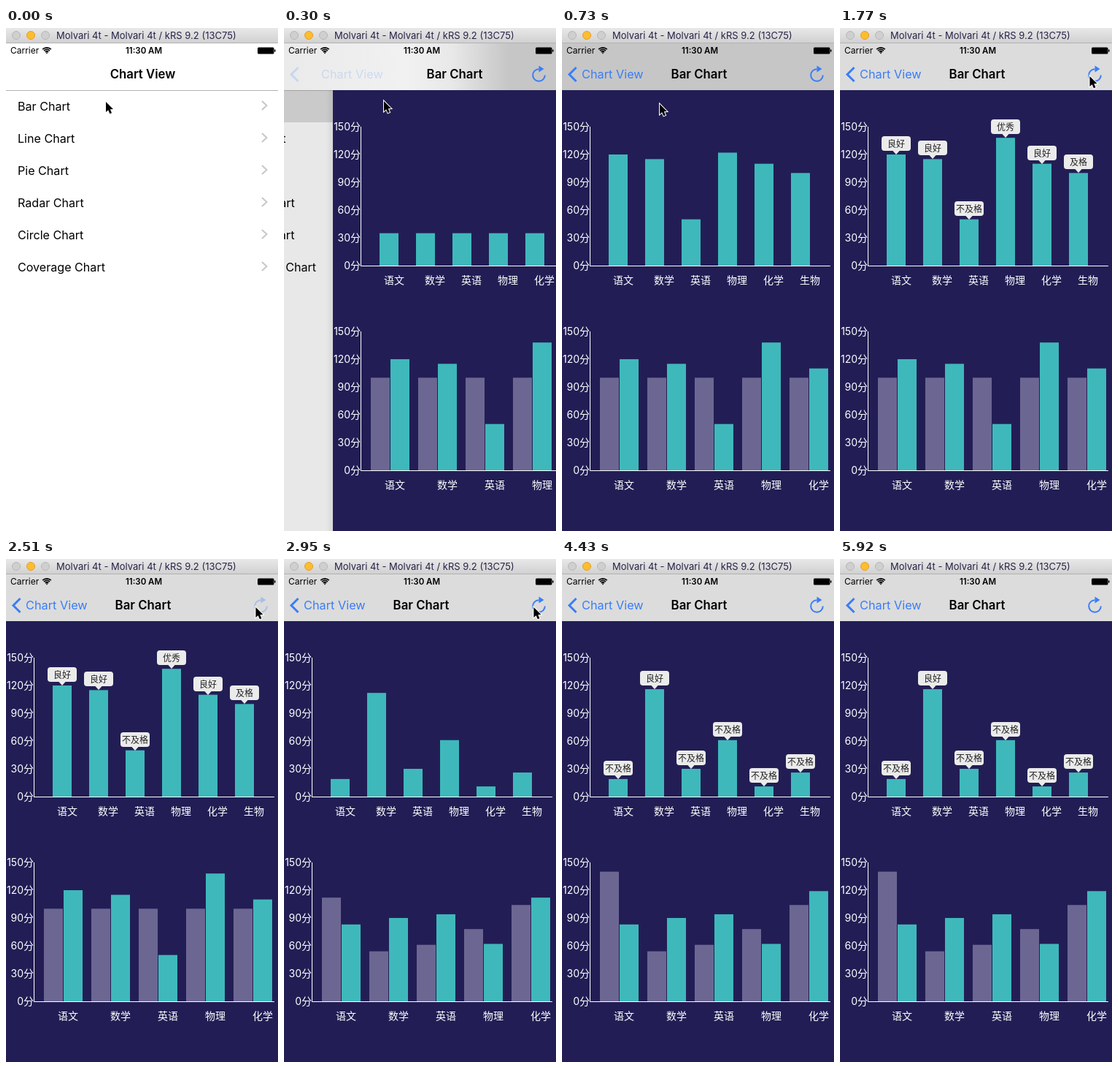
These frames come from a looping animation (373 px wide and 688 px high, 6950 ms). An HTML page with a canvas:

```html
<!DOCTYPE html>
<html lang="en">
<meta charset="utf-8">
<title>Chart View</title>
<style>
  html, body { margin: 0; width: 100%; height: 100%; overflow: hidden; background: #fff; }
  canvas { display: block; }
</style>
<canvas id="stage" width="373" height="688"></canvas>
<script>
const ctx = document.getElementById('stage').getContext('2d');
const W = 373, H = 688, LOOP = 6950;
const BLUE = '#3a7df7', NAVY = '#221e55', TEAL = '#3fb8bb', MAUVE = '#6c6792';
const PUSH = 128, REFRESH = 2441;

// The screen is refreshed at these moments and holds in between.
const TICKS = [0, 150, 300, 440, 590, 730, 880, 1020, 1170, 1320, 1470, 1620, 1770,
  2370, 2520, 2660, 2810, 2950, 3100, 3240, 3390, 3540, 3690,
  3980, 4130, 4280, 4430, 5630, 5780, 5920];

// Pointer path: time, x, y
const PATH = [[0, 137, 101], [300, 137, 100], [730, 134, 104], [1020, 134, 104],
  [1620, 342.5, 66], [3840, 342.5, 66], [4280, 362, 646], [4430, 400, 720],
  [5629, 400, 720], [5630, 306, 583], [5780, 307, 653], [5920, 307, 720], [LOOP, 307, 720]];

const ROWS = ['Bar', 'Line', 'Pie', 'Radar', 'Circle', 'Coverage'];
const SUBJECTS = ['语文', '数学', '英语', '物理', '化学', '生物'];
const FIRST = {
  start: 127, rate: 0.2023, animateAll: false,
  single: [120, 115, 50, 138, 110, 100],
  back: [100, 100, 100, 100, 100], front: [120, 115, 50, 138, 110]
};
const SECOND = {
  start: REFRESH, rate: 0.22, animateAll: true,
  single: [19, 116, 30, 61, 11, 26],
  back: [140, 54, 61, 78, 104], front: [83, 90, 94, 62, 119]
};

const clamp = v => Math.max(0, Math.min(1, v));
const grade = v => v > 130 ? '优秀' : v >= 110 ? '良好' : v >= 90 ? '及格' : '不及格';
const barHeight = v => v * 190 / 150;

function rect(x, y, w, h, color) {
  ctx.fillStyle = color;
  ctx.fillRect(x, y, w, h);
}

function text(s, x, y, size, color, align = 'left', weight = 400) {
  ctx.font = `${weight} ${size}px Inter, "Noto Sans CJK SC", "Noto Sans CJK", sans-serif`;
  ctx.textAlign = align;
  ctx.fillStyle = color;
  ctx.fillText(s, x, y);
}

function gradient(x0, y0, x1, y1, ...stops) {
  const g = ctx.createLinearGradient(x0, y0, x1, y1);
  stops.forEach(([at, color]) => g.addColorStop(at, color));
  return g;
}

function shape(points, close) {
  ctx.beginPath();
  points.forEach(([x, y]) => ctx.lineTo(x, y));
  if (close) ctx.closePath();
}

function line(points, color, width) {
  shape(points);
  ctx.strokeStyle = color;
  ctx.lineWidth = width;
  ctx.stroke();
}

function faded(alpha, draw) {
  ctx.save();
  ctx.globalAlpha *= clamp(alpha);
  draw();
  ctx.restore();
}

function windowBar() {
  rect(0, 0, W, 20, gradient(0, 0, 0, 20, [0, '#e9e8e9'], [1, '#d2d1d2']));
  rect(0, 20, W, 1, '#b4b3b4');
  [[14, '#d0cfd0', '#b8b7b8'], [34, '#fdbd2e', '#e0a028'], [54, '#d0cfd0', '#b8b7b8']].forEach(([x, fill, edge]) => {
    ctx.beginPath();
    ctx.arc(x, 10, 5.5, 0, 7);
    ctx.fillStyle = fill;
    ctx.fill();
    ctx.strokeStyle = edge;
    ctx.lineWidth = 1;
    ctx.stroke();
  });
  text('Molvari 4t - Molvari 4t / kRS 9.2 (13C75)', 69, 15, 13, '#262446');
}

function statusBar() {
  text('Carrier', 6, 35, 12, '#000');
  text('11:30 AM', 189, 35, 11.5, '#000', 'center', 600);
  ctx.strokeStyle = '#000';
  ctx.lineWidth = 1.7;
  [3, 5.6, 8.2].forEach(r => {
    ctx.beginPath();
    ctx.arc(56, 35, r, -Math.PI * 0.75, -Math.PI * 0.25);
    ctx.stroke();
  });
  shape([[56, 35.5], [54.5, 33.5], [57.5, 33.5]], true);
  ctx.fillStyle = '#000';
  ctx.fill();
  ctx.beginPath();
  ctx.roundRect(345, 26.5, 22.5, 9, 1.5);
  ctx.fill();
  rect(368, 29.5, 1.5, 3, '#000');
}

function list(shift, pressed) {
  ctx.save();
  ctx.translate(shift, 0);
  if (pressed) rect(0, 86, W, 43, '#dedede');
  ROWS.forEach((name, i) => {
    const y = 106 + 44 * i;
    text(name + ' Chart', 16, y + 7, 16.1, '#000');
    line([[351, y - 6], [357.5, y], [351, y + 6]], '#c7c7cc', 2);
  });
  ctx.restore();
}

function axes(top, count, labelX) {
  for (let i = 0; i < 6; i++) text(150 - 30 * i + '分', 38, top + 5 + 38 * i, 14, '#fff', 'right');
  rect(38, top, 1, 191, '#fff');
  rect(38, top + 190, 330, 1, '#fff');
  for (let i = 0; i < count; i++) text(SUBJECTS[i], labelX(i), top + 215, 14, '#fff', 'center');
}

function bar(x, base, value, color) {
  const h = barHeight(value);
  rect(x, base - h, 26, h, color);
}

function badge(x, y, label) {
  ctx.beginPath();
  ctx.roundRect(x - 20, y - 25, 40, 20, 4);
  ctx.fillStyle = '#ebebeb';
  ctx.fill();
  shape([[x - 5, y - 5.5], [x + 5, y - 5.5], [x, y]], true);
  ctx.fill();
  text(label, x, y - 10.5, 12, '#222', 'center');
}

function charts(x, t) {
  const data = t < REFRESH ? FIRST : SECOND;
  const age = t - data.start;
  const limit = Math.max(0, age * data.rate);
  const limit2 = data.animateAll ? limit : 150;
  ctx.save();
  ctx.translate(x, 0);
  rect(-9, 85, 9, H - 85, gradient(-9, 0, 0, 0, [0, 'rgba(0,0,0,0)'], [1, 'rgba(0,0,0,0.08)']));
  rect(0, 85, W, H - 85, NAVY);
  data.single.forEach((v, i) => bar(64 + 50 * i, 325, Math.min(v, limit), TEAL));
  data.back.forEach((v, i) => {
    bar(52 + 65 * i, 605, Math.min(v, limit2), MAUVE);
    bar(79 + 65 * i, 605, Math.min(data.front[i], limit2), TEAL);
  });
  axes(135, 6, i => i ? 90 + 50 * i : 84);
  axes(415, 5, i => i ? 92 + 65 * i : 85);
  faded((age - 950) / 290, () => data.single.forEach((v, i) =>
    badge(77 + 50 * i, 325 - Math.round(barHeight(v)), grade(v))));
  ctx.restore();
}

function refreshIcon() {
  ctx.beginPath();
  ctx.arc(349.5, 64.5, 8.3, 0, Math.PI * 1.5);
  ctx.strokeStyle = BLUE;
  ctx.lineWidth = 2;
  ctx.stroke();
  shape([[349.5, 51.5], [356.5, 56], [349.5, 60.5]], true);
  ctx.fillStyle = BLUE;
  ctx.fill();
}

function navBar(p, x, t) {
  if (p > 0) {
    // The translucent bar darkens where the chart screen has slid under it.
    const shade = t < 880 ? '#c6c6c6' : '#dcdcdc';
    rect(0, 21, W, 64, x
      ? gradient(0, 0, x * 4.6, 0, [0, '#eaeaeb'], [0.55, '#f1f1f1'], [0.75, '#e8e8e8'], [1, shade])
      : shade);
  }
  const rest = 1 - p;
  faded(1 - p * 3, () => text('Chart View', 187.5 - 116 * p, 69, 16.8, '#000', 'center', 600));
  if (!p) return;
  faded((p - 0.78) / 0.22, () => {
    line([[19.5, 54], [10, 63.5], [19.5, 73]], BLUE, 3);
    text('Chart View', 27 + 134 * rest, 69, 16.3, BLUE);
  });
  faded(p * 1.25, () => text('Bar Chart', 188 + 256 * rest, 69, 16.8, '#000', 'center', 600));
  faded(t >= 2370 && t < REFRESH ? 0.3 : p * 1.25, refreshIcon);
}

function pointer(t) {
  const i = PATH.findIndex(k => k[0] > t);
  const [t0, x0, y0] = PATH[i - 1], [t1, x1, y1] = PATH[i];
  const s = (t - t0) / (t1 - t0);
  ctx.save();
  ctx.translate(x0 + (x1 - x0) * s, y0 + (y1 - y0) * s);
  shape([[0, 0], [0, 14], [3.2, 11.2], [5.4, 16.3], [8, 15.2], [5.8, 10.2], [10, 10]], true);
  ctx.strokeStyle = '#fff';
  ctx.lineWidth = 2;
  ctx.stroke();
  ctx.fillStyle = '#000';
  ctx.fill();
  ctx.restore();
}

function draw(t) {
  // Critically damped push of the chart screen over the list
  const d = Math.max(0, t - PUSH) * 0.01826;
  const x = Math.round(W * (1 + d) * Math.exp(-d));
  const p = 1 - x / W;
  rect(0, 0, W, H, '#fff');
  list(-112 * p, p > 0);
  rect(0, 85, W, 1, '#b2b2b2');
  rect(0, 85, W, H - 85, `rgba(0,0,0,${0.11 * p})`);
  if (p > 0) charts(x, t);
  navBar(p, x, t);
  statusBar();
  windowBar();
  pointer(t);
}

function frame() {
  const t = performance.now() % LOOP;
  draw(TICKS.findLast(k => k <= t));
  requestAnimationFrame(frame);
}
frame();
</script>
</html>
```
